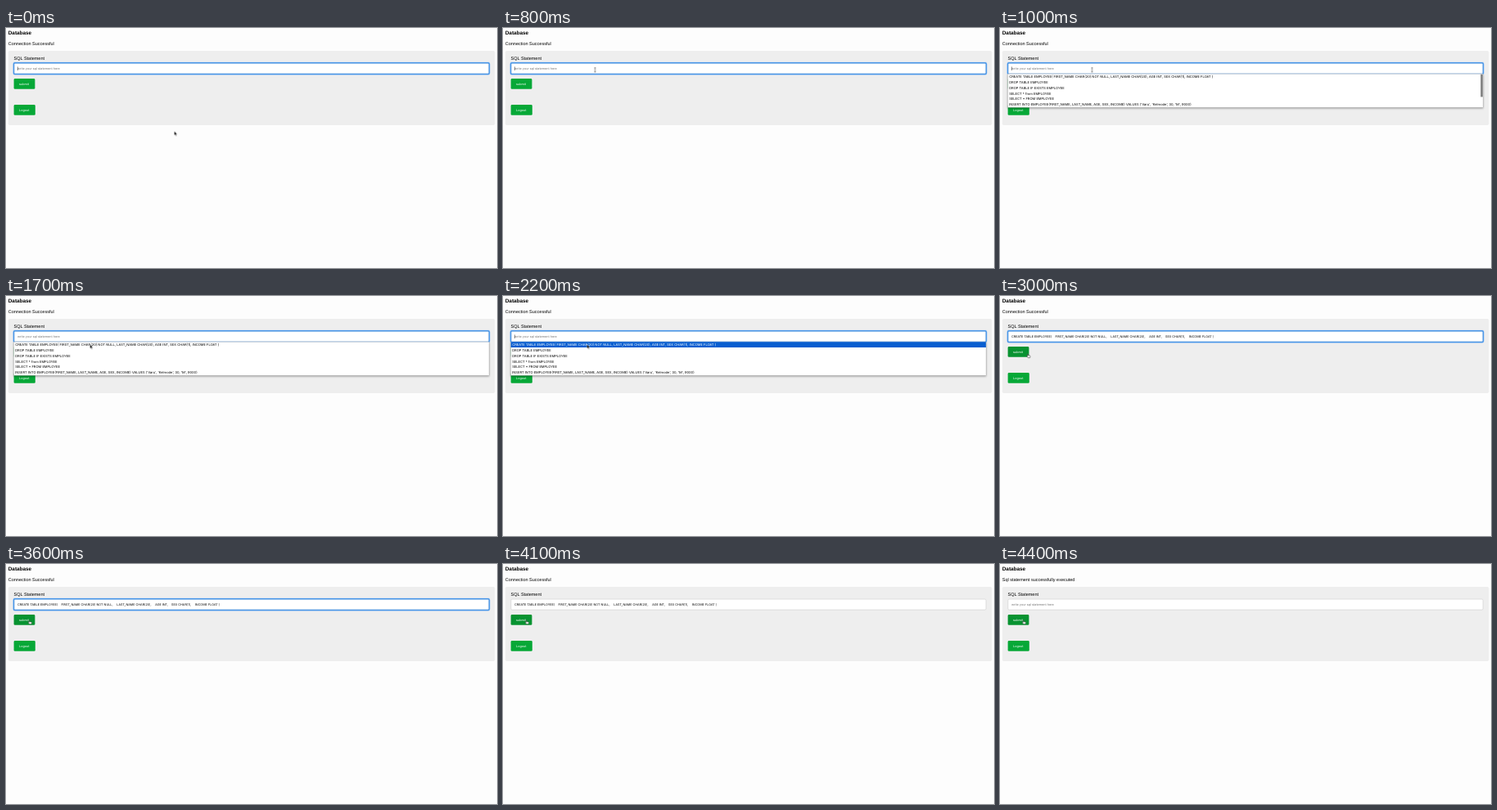
An HTML page for the animation above (5000 ms loop, 600 by 294 pixels).

```html
<!DOCTYPE html>
<html lang="en">
<head>
<meta charset="utf-8">
<title>Database</title>
<style>
  html, body { margin: 0; width: 100%; height: 100%; overflow: hidden; background: #fdfdfd; }
  svg { display: block; width: 100%; height: 100%; }
  text { font: 5.5px "Liberation Sans", Arial, sans-serif; text-rendering: geometricPrecision; }
  .title { font-size: 6.4px; font-weight: bold; }
  .field, .label { font: 3.76px Inter, "Open Sans", sans-serif; }
  .label { fill: #fff; }
  .hint { fill: #757575; }
  #rows text { font: 4.07px Inter, "Open Sans", sans-serif; }
  .panel { fill: #eee; }
  .button { fill: #07a837; }
  .box { fill: #fff; stroke: #c4c4c4; stroke-width: .5; }
  .ring { fill: none; stroke: #4795e8; stroke-width: 1.5; }
  .glow { fill: none; stroke: #9cc8f7; stroke-width: .6; opacity: .6; }
  .menu { fill: #fff; stroke: #b9b9b9; stroke-width: .35; filter: drop-shadow(0 1.3px 1.3px rgba(0, 0, 0, .38)); }
  .caret { fill: #111; }
  .pointer { fill: #000; stroke: #fff; stroke-width: .45; stroke-linejoin: round; }
</style>
</head>
<body>
<svg viewBox="0 0 600 294" preserveAspectRatio="none">
  <text class="title" x="2.75" y="8">Database</text>
  <text id="connected" x="2.75" y="20.8">Connection Successful</text>
  <text id="executed" x="2.75" y="20.8">Sql statement successfully executed</text>

  <rect class="panel" x="2.75" y="28" width="594.7" height="91" rx="1.7"/>
  <text x="9.6" y="39.4">SQL Statement</text>

  <rect class="box" x="9.8" y="43.1" width="580.4" height="13" rx="1.4"/>
  <g id="focus">
    <rect class="glow" x="8.6" y="41.8" width="582.8" height="15.6" rx="1.8"/>
    <rect class="ring" x="9.5" y="42.7" width="581" height="13.8" rx="1.2"/>
  </g>
  <text id="hint" class="field hint" x="14" y="51.1">write your sql statement here</text>
  <text id="query" class="field" y="51.1">
    <tspan x="14">CREATE TABLE EMPLOYEE(</tspan>
    <tspan x="67.4">FIRST_NAME CHAR(20) NOT NULL,</tspan>
    <tspan x="135.3">LAST_NAME CHAR(20),</tspan>
    <tspan x="182.2">AGE INT,</tspan>
    <tspan x="202">SEX CHAR(1),</tspan>
    <tspan x="230.8">INCOME FLOAT )</tspan>
  </text>
  <rect id="startCaret" class="caret" x="13.9" y="47.4" width=".5" height="4.6"/>
  <rect id="endCaret" class="caret" x="261" y="47.4" width=".5" height="4.6"/>

  <rect id="submit" class="button" x="9.6" y="62" width="25.8" height="12.8" rx="1.4"/>
  <text class="label" x="16.1" y="69.8">submit</text>
  <rect class="button" x="9.6" y="94" width="26.2" height="12.8" rx="1.4"/>
  <text class="label" x="16.1" y="101.7">Logout</text>

  <g id="menu">
    <rect class="menu" x="9.6" y="56.2" width="580.6" height="41"/>
    <rect id="highlight" x="9.6" y="56.2" width="580.6" height="6.8" fill="#085ed0"/>
    <g id="rows"></g>
    <rect id="scrollbar" x="587.4" y="56.8" width="2.4" height="27.6" fill="#777"/>
  </g>

  <g id="mouse">
    <path id="arrow" class="pointer" d="M0 0V5L1.2 4L2 5.9L2.9 5.5L2.1 3.7H3.7Z"/>
    <path id="beam" d="M-1-2.7Q0-2.7 0-2V2Q0 2.7-1 2.7M1-2.7Q0-2.7 0-2M0 2Q0 2.7 1 2.7" fill="none" stroke="#222" stroke-width=".55"/>
    <path id="hand" d="M-.4 0Q0-.6.4 0V1.7L2.6 2.1Q3.1 2.3 3 3L2.6 4.7H.2L-1.3 2.7Q-1.2 2-.4 2.5Z" fill="#fff" stroke="#111" stroke-width=".45"/>
  </g>
</svg>
<script>
  const LOOP = 5000;
  const el = id => document.getElementById(id);

  const history = [
    "CREATE TABLE EMPLOYEE( FIRST_NAME CHAR(20) NOT NULL, LAST_NAME CHAR(20), AGE INT, SEX CHAR(1), INCOME FLOAT )",
    "DROP TABLE EMPLOYEE",
    "DROP TABLE IF EXISTS EMPLOYEE",
    "SELECT * from EMPLOYEE",
    "SELECT * FROM EMPLOYEE",
    "INSERT INTO EMPLOYEE(FIRST_NAME, LAST_NAME, AGE, SEX, INCOME) VALUES ('Varu', 'Kelmode', 30, 'M', 9000)"
  ];
  history.forEach((line, i) => {
    const row = document.createElementNS("http://www.w3.org/2000/svg", "text");
    row.setAttribute("x", 11.2);
    row.setAttribute("y", 61 + i * 6.85);
    row.textContent = line;
    el("rows").append(row);
  });

  // Each step is [time, value]; a value holds until the next step.
  function hold(node, prop, steps) {
    const frames = steps.map(([time, value]) =>
      ({ offset: time / LOOP, [prop]: value, easing: "step-end" }));
    frames.push({ offset: 1, [prop]: steps.at(-1)[1] });
    node.animate(frames, { duration: LOOP, iterations: Infinity });
  }

  // Visible during the listed [from, to] spans.
  function show(id, ...spans) {
    const steps = spans[0][0] > 0 ? [[0, 0]] : [];
    for (const [from, to] of spans) {
      steps.push([from, 1]);
      if (to < LOOP) steps.push([to, 0]);
    }
    hold(el(id), "opacity", steps);
  }

  show("connected", [0, 4400]);
  show("executed", [4400, LOOP]);
  show("focus", [0, 3700]);
  show("hint", [0, 2300], [4400, LOOP]);
  show("query", [2300, 4400]);
  show("startCaret", [0, 1600], [2100, 2300]);
  show("endCaret", [2300, 2500], [3100, 3600]);
  show("menu", [1000, 2300]);
  show("highlight", [1900, 2300]);
  show("arrow", [0, 800], [1400, 3000]);
  show("beam", [800, 1400]);
  show("hand", [3000, LOOP]);

  hold(el("scrollbar"), "opacity", [[0, 1], [1400, .7], [1500, .35], [1600, 0]]);
  hold(el("submit"), "fill", [[0, "#07a837"], [3000, "#089331"]]);
  hold(el("rows").firstChild, "fill", [[0, "#000"], [1900, "#fff"], [2300, "#000"]]);

  const path = [
    [0, 205.6, 126.4], [800, 112.5, 51.3], [1300, 110, 53],
    [1400, 107, 57], [1500, 104.5, 58.4], [1600, 103.2, 59.1],
    [1700, 102.6, 59.3], [2300, 101.7, 59.3], [2700, 96, 62],
    [2800, 76, 69], [2900, 50, 72], [3000, 34, 71],
    [3100, 29.5, 69.4], [3200, 28.2, 68.9], [3300, 28.4, 69], [4100, 28.5, 68.9]
  ];
  hold(el("mouse"), "transform", path.map(([t, x, y]) => [t, `translate(${x}px, ${y}px)`]));
</script>
</body>
</html>
```
